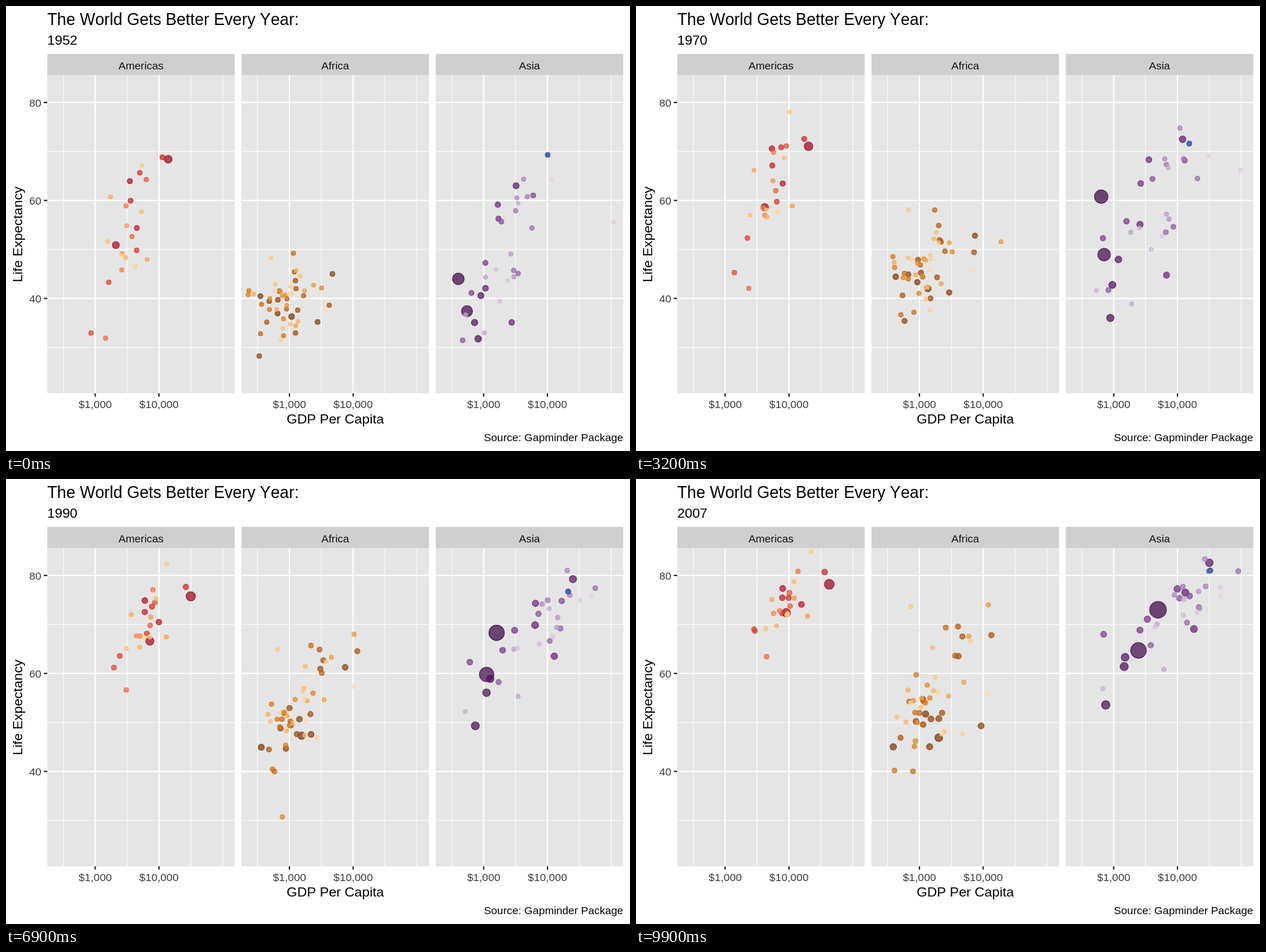
Recreate the animation shown at these times as an HTML page with a canvas. Size 885 px wide and 632 px high, loop 10000 ms.

```html
<!DOCTYPE html>
<html lang="en">
<head>
<meta charset="utf-8">
<title>The World Gets Better Every Year</title>
<style>
html, body { margin: 0; width: 100%; height: 100%; overflow: hidden; background: #fff; }
canvas { display: block; }
</style>
</head>
<body>
<canvas id="stage" width="885" height="632"></canvas>
<script>
const ctx = document.getElementById('stage').getContext('2d');
const STEPS = 100, STEP_MS = 100;
const KEY_YEARS = [1952, 1970, 1990, 2007];
const FIRST = KEY_YEARS[0], LAST = KEY_YEARS[3];
const LEFT = 58.5, WIDTH = 265.9, GAP = 9.6, TOP = 98.4, BOTTOM = 550;

const px = logGdp => (logGdp - 2.248) / 2.941 * WIDTH;
const py = life => BOTTOM - (life - 20.65) / 64.9 * (BOTTOM - TOP);
const mix = (a, b, t) => a + (b - a) * t;

let seed = 1952;
function random() {
  seed = (Math.imul(seed, 1664525) + 1013904223) >>> 0;
  return seed / 4294967296;
}
// Bell-shaped noise with unit variance.
const bell = () => 2 * (random() + random() + random() - 1.5);

// Interpolates the rows given for the key years.
function along(rows, year) {
  let i = 0;
  while (i < 2 && KEY_YEARS[i + 1] < year) i++;
  const t = (year - KEY_YEARS[i]) / (KEY_YEARS[i + 1] - KEY_YEARS[i]);
  return rows[i].map((v, j) => mix(v, rows[i + 1][j], t));
}

// Colour ramp over evenly spaced hex stops, slightly darkened.
function ramp(stops, t) {
  const pos = t * (stops.length - 1);
  const i = Math.min(Math.floor(pos), stops.length - 2);
  const rgb = [16, 8, 0].map(s => {
    const v = mix(stops[i] >> s & 255, stops[i + 1] >> s & 255, pos - i);
    return Math.round(255 * Math.pow(v / 255, 1.1));
  });
  return `rgba(${rgb},0.7)`;
}

// A country drifts inside its cloud by slowly turning one noise value into another.
// Cloud rows: mean log GDP, its spread, mean life, its spread, correlation.
function wander(cloud, lean) {
  const [u0, u1, v0, v1] = [bell(), bell(), bell(), bell()];
  return year => {
    const [x, dx, y, dy, c] = along(cloud, year);
    const a = 0.8 * (year - FIRST) / (LAST - FIRST);
    const u = u0 * Math.cos(a) + u1 * Math.sin(a) + lean;
    const v = v0 * Math.cos(a) + v1 * Math.sin(a);
    return [x + dx * u, y + dy * (c * u + Math.sqrt(1 - c * c) * v)];
  };
}

// Dots run from the most to the least populous (millions); leads have paths of their own.
function makeDots({ count, stops, top, decay, growth, cloud, lean = 0, leads = [] }) {
  return Array.from({ length: count }, (_, rank) => {
    const t = rank / (count - 1);
    const lead = leads.find(l => l.rank === rank);
    return {
      growth,
      color: ramp(stops, t),
      pop: lead ? lead.pop : top * Math.exp(-decay * t),
      place: lead ? year => along(lead.path, year) : wander(cloud, lean * (t - 0.5))
    };
  });
}

// Path points are GDP per head and life expectancy at the key years.
const lead = (rank, pop, ...path) => ({ rank, pop, path: path.map(([gdp, life]) => [Math.log10(gdp), life]) });

const americas = makeDots({
  count: 25, top: 60, decay: 3.6, growth: 2.2,
  stops: [0xA50026, 0xD73027, 0xF46D43, 0xFDAE61, 0xFEE090],
  cloud: [[3.47, 0.19, 52, 8.3, 0.5], [3.67, 0.2, 61, 7, 0.6], [3.73, 0.2, 69, 4.6, 0.6], [3.87, 0.24, 73.2, 3.8, 0.6]],
  leads: [
    lead(0, 301, [13990, 68.4], [20400, 71.1], [31400, 75.7], [42950, 78.2]),
    lead(1, 190, [2110, 50.9], [4210, 58.7], [7180, 66.5], [9070, 72.4]),
    lead(5, 33, [11370, 68.8], [17500, 72.6], [26300, 77.6], [36320, 80.7])
  ]
});

const africa = makeDots({
  count: 52, top: 70, decay: 4.2, growth: 3.8,
  stops: [0x7F3B08, 0xB35806, 0xE08214, 0xFDB863, 0xFEE0B6],
  cloud: [[2.96, 0.27, 39, 4.7, 0.3], [3.1, 0.29, 46, 5.6, 0.4], [3.13, 0.36, 52.5, 7, 0.65], [3.17, 0.4, 54.5, 8.4, 0.5]],
  leads: [
    lead(0, 135, [1080, 36.3], [1360, 42.1], [1540, 47.3], [2010, 46.9]),
    lead(4, 44, [4725, 45], [7460, 52.9], [7460, 61.5], [9270, 49.3]),
    lead(28, 9, [493, 40], [560, 44.3], [773, 30.4], [863, 46.2]),
    lead(32, 6, [2390, 42.7], [19600, 51.7], [10300, 67.9], [12060, 74])
  ]
});

const asia = makeDots({
  count: 33, top: 250, decay: 5, growth: 2.6, lean: 1,
  stops: [0x40004B, 0x762A83, 0x9970AB, 0xC2A5CF, 0xE7D4E8],
  cloud: [[3.13, 0.32, 47, 8.2, 0.6], [3.4, 0.41, 56, 8.3, 0.6], [3.6, 0.48, 66.5, 6.5, 0.8], [3.78, 0.5, 71, 6, 0.8]],
  leads: [
    lead(0, 1318, [400, 44], [641, 61], [1560, 68.2], [4960, 73]),
    lead(1, 1110, [547, 37.4], [710, 49.1], [1094, 59.7], [2450, 64.7]),
    lead(5, 127, [3220, 63], [12250, 72.6], [25000, 79.2], [31660, 82.6]),
    lead(31, 2.5, [108400, 55.6], [96700, 66.3], [32200, 74.9], [47300, 77.6])
  ]
});

const oceania = makeDots({
  count: 2, top: 20, decay: 1.6, growth: 2.2,
  stops: [0x313695, 0x4575B4],
  cloud: [[4.01, 0.01, 69.2, 0.2, 0], [4.19, 0.01, 71.6, 0.1, 0], [4.31, 0.05, 76.4, 0.7, 0.9], [4.47, 0.07, 80.7, 0.5, 0.9]]
});

const panels = [['Americas', americas], ['Africa', africa], ['Asia', asia.concat(oceania)]];

function text(str, x, y, size, color, align = 'left') {
  ctx.font = `${size}px "Liberation Sans", Arial, sans-serif`;
  ctx.fillStyle = color;
  ctx.textAlign = align;
  ctx.fillText(str, x, y);
}

function rect(color, x, y, w, h) {
  ctx.fillStyle = color;
  ctx.fillRect(x, y, w, h);
}

function drawDot({ pop, growth, color, place }, left, year) {
  const [x, y] = place(year);
  const size = pop * mix(1 / growth, 1, (year - FIRST) / (LAST - FIRST));
  ctx.beginPath();
  ctx.arc(left + px(x), py(y), 2.49 + 9.33 * Math.sqrt(size / 1318), 0, 2 * Math.PI);
  ctx.fillStyle = ctx.strokeStyle = color;
  ctx.lineWidth = 1.24;
  ctx.fill();
  ctx.stroke();
}

function drawPanel(title, dots, left, year) {
  const vline = (v, w) => rect('#fff', left + px(v) - w / 2, TOP, w, BOTTOM - TOP);
  const hline = (v, w) => rect('#fff', left, py(v) - w / 2, WIDTH, w);
  rect('#cfcfcf', left, 68, WIDTH, TOP - 68);
  rect('#e5e5e5', left, TOP, WIDTH, BOTTOM - TOP);
  text(title, left + WIDTH / 2, 90, 15.4, '#111', 'center');
  [30, 50, 70].forEach(v => hline(v, 0.93));
  [2.5, 3.5, 4.5, 5].forEach(v => vline(v, 0.93));
  [40, 60, 80].forEach(v => hline(v, 1.87));
  [3, 4].forEach(v => {
    vline(v, 1.87);
    rect('#222', left + px(v) - 0.93, BOTTOM, 1.87, 4.8);
    text(v === 3 ? '$1,000' : '$10,000', left + px(v), 570.5, 15.4, '#3c3c3c', 'center');
  });
  dots.forEach(d => drawDot(d, left, year));
}

function draw(now) {
  const step = Math.floor(now / STEP_MS) % STEPS;
  const year = mix(FIRST, LAST, step / (STEPS - 1));
  rect('#fff', 0, 0, 885, 632);
  ctx.fontKerning = 'none';
  text('The World Gets Better Every Year:', LEFT, 26.5, 23.1, '#000');
  text(Math.round(year), LEFT, 55, 19.25, '#000');
  panels.forEach(([title, dots], i) => drawPanel(title, dots, LEFT + i * (WIDTH + GAP), year));
  [40, 60, 80].forEach(v => {
    rect('#222', LEFT - 4.8, py(v) - 0.93, 4.8, 1.87);
    text(v, 50, py(v) + 5.7, 15.4, '#3c3c3c', 'right');
  });
  text('GDP Per Capita', 467, 593, 19.25, '#000', 'center');
  text('Source: Gapminder Package', 875.4, 618, 15.4, '#000', 'right');
  ctx.save();
  ctx.translate(23, (TOP + BOTTOM) / 2);
  ctx.rotate(-Math.PI / 2);
  text('Life Expectancy', 0, 0, 19.25, '#000', 'center');
  ctx.restore();
  requestAnimationFrame(draw);
}
requestAnimationFrame(draw);
</script>
</body>
</html>
```
